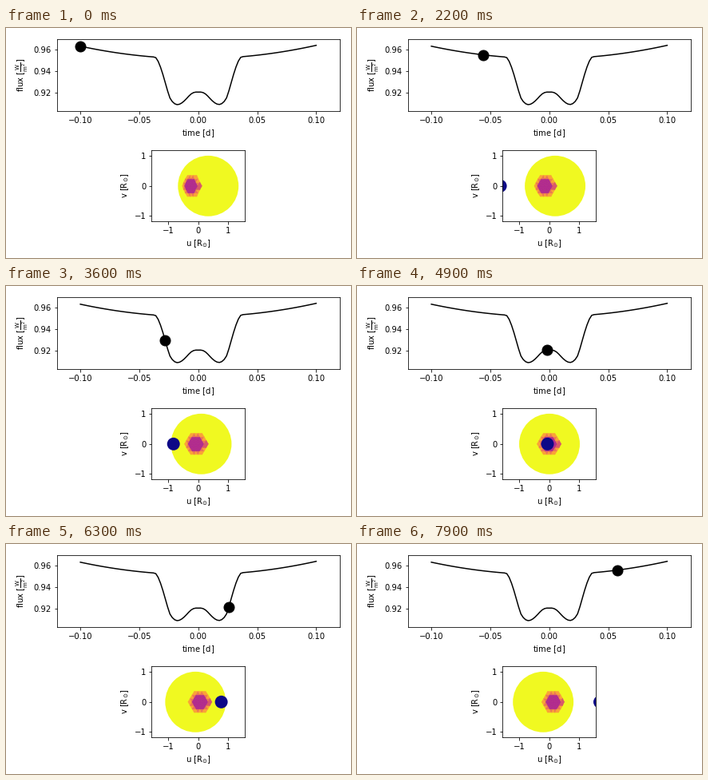
Animation of 432x288 px, one loop 8000 ms. Source, as a matplotlib script:

```python
import numpy as np
import matplotlib.pyplot as plt
from matplotlib.animation import FuncAnimation
from matplotlib.collections import PolyCollection
from matplotlib.patches import Circle

W, H, DPI = 432, 288, 72
FRAMES, STEP = 80, 100
YELLOW, NAVY = "#f0f921", "#0d0887"
PURPLE, RED, CORAL, ORANGE = "#b12a90", "#d8576b", "#ea7457", "#fba238"
A_STAR, A_PLANET = 0.567, 4.73  # orbit radii, period of one day
R_PLANET = 0.213
LIMB, DEPTH = 0.65, 0.052
SPOT_DIM, SPOT_CORE, SPOT_EDGE = 0.4, 0.25, 0.42


def light_curve(phase, t):
    """Tidal brightening minus the starlight hidden by the planet."""
    n = 40
    rho = R_PLANET * np.sqrt((np.arange(n) + 0.5) / n)
    theta = 2 * np.pi * (np.arange(2 * n) + 0.5) / (2 * n)
    dx = np.outer(rho, np.cos(theta)).ravel()
    y = np.outer(rho, np.sin(theta)).ravel()
    centre = np.sin(phase)[:, None]
    x = (A_STAR + A_PLANET) * centre + dx

    r2 = x ** 2 + y ** 2
    glow = 1 - LIMB * (1 - np.sqrt(np.clip(1 - r2, 0, 1)))
    fade = np.interp(np.hypot(x - centre, y), [SPOT_CORE, SPOT_EDGE], [1, 0])
    hidden = np.where(r2 < 1, glow * (1 - SPOT_DIM * fade), 0).mean(axis=1)
    return 0.9518 + 0.004 * t + 1.19 * t ** 2 - DEPTH * hidden


def spot_mesh(rings=3, side=0.138):
    """Hexagon of triangles as longitude/latitude offsets, with colours."""
    tris, colors = [], []
    for i in range(-rings, rings):
        for j in range(-rings, rings):
            for cell in (((i, j), (i + 1, j), (i, j + 1)),
                         ((i + 1, j), (i + 1, j + 1), (i, j + 1))):
                norm = [max(abs(a), abs(b), abs(a + b)) for a, b in cell]
                if max(norm) > rings:
                    continue
                tri = np.array([(a + b / 2, b * 3 ** 0.5 / 2) for a, b in cell]) * side
                cx, cy = tri.mean(axis=0)
                color = (PURPLE, CORAL, ORANGE)[norm.count(rings)]
                if color != PURPLE and cx > 0.24 and -0.12 < cy < 0.05:
                    color = RED
                tris.append(tri)
                colors.append(color)
    return np.array(tris), colors


def add_axes(left, top, right, bottom):
    return fig.add_axes([left / W, 1 - bottom / H, (right - left) / W, (bottom - top) / H])


plt.rcParams.update({"font.family": "DejaVu Sans", "font.size": 10})
fig = plt.figure(figsize=(W / DPI, H / DPI), dpi=DPI, facecolor="white")

times = np.linspace(-0.1, 0.1, 101)
phases = 2 * np.pi * times
flux = light_curve(phases, times)

ax = add_axes(63.6, 14.4, 417.9, 104.4)
ax.set(xlim=(-0.12, 0.12), ylim=(0.903, 0.9695),
       xticks=[-0.1, -0.05, 0, 0.05, 0.1], yticks=[0.92, 0.94, 0.96],
       xlabel=r"time [$\mathrm{d}$]", ylabel=r"flux [$\mathrm{\frac{W}{m^{2}}}$]")
ax.plot(times, flux, "k-", lw=1.5)
dot, = ax.plot([], [], "ko", ms=13, mew=1, zorder=3)

sky = add_axes(182.2, 153.3, 299.3, 242.3)
sky.set(xlim=(-1.561, 1.561), ylim=(-1.187, 1.187),
        xticks=[-1, 0, 1], yticks=[-1, 0, 1],
        xlabel=r"u [$\mathrm{R_{\odot}}$]", ylabel=r"v [$\mathrm{R_{\odot}}$]")
star = sky.add_patch(Circle((0, 0), 1.012, fc=YELLOW, ec="none", zorder=1))
mesh, colors = spot_mesh()
spot = PolyCollection(mesh, facecolors=colors, edgecolors="face", linewidths=0.6, zorder=1.1)
sky.add_collection(spot, autolim=False)
planet = sky.add_patch(Circle((0, 0), R_PLANET, fc=NAVY, ec="none", zorder=1.2))


def update(n):
    phase = phases[n]
    u = -A_STAR * np.sin(phase)
    star.center = (u, 0)
    planet.center = (A_PLANET * np.sin(phase), 0)
    lon, lat = mesh[..., 0] + phase, mesh[..., 1]
    spot.set_verts(np.stack([u + np.cos(lat) * np.sin(lon), np.sin(lat)], axis=-1))
    dot.set_data([times[n]], [flux[n]])
    return star, spot, planet, dot


anim = FuncAnimation(fig, update, frames=FRAMES, interval=STEP, repeat=True, repeat_delay=0)
plt.show()
```
